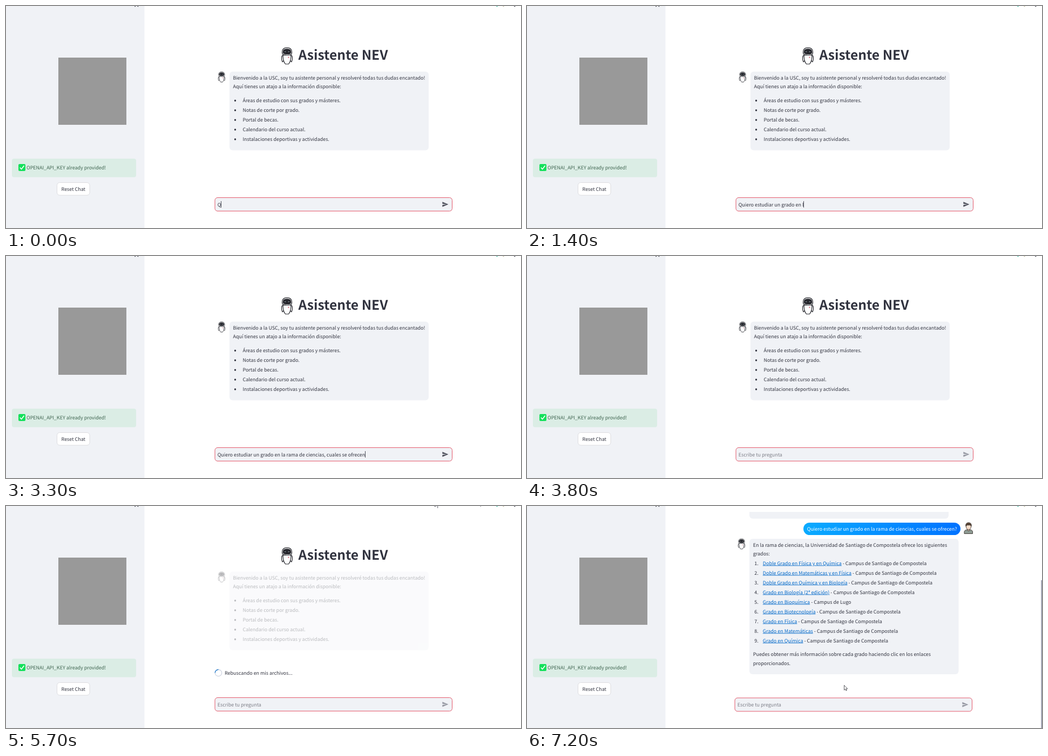
Animation of 954x413 px, one loop 7300 ms. Source, as an HTML page:

```html
<!DOCTYPE html>
<html lang="es">
<head>
<meta charset="utf-8">
<title>Chat</title>
<style>
  html, body { margin: 0; width: 100%; height: 100%; overflow: hidden; background: #fff; }
  svg { display: block; width: 954px; height: 413px; }
  text {
    font-family: "Noto Sans CJK JP", "Noto Sans CJK SC", "Noto Sans CJK", "Noto Sans", sans-serif;
    font-size: 8.96px; fill: #31333f; white-space: pre; text-rendering: geometricPrecision;
  }
  .title { font-size: 24.6px; font-weight: 700; }
  .link { fill: #0068c9; text-decoration: underline; }
</style>
</head>
<body>
<svg viewBox="0 0 954 413">
  <defs>
    <linearGradient id="sky"><stop stop-color="#0aabff"/><stop offset="1" stop-color="#0072ff"/></linearGradient>
    <g id="bot" stroke="#25262c" stroke-width="1.2" stroke-linejoin="round">
      <path d="M4 13.500C.5 16 0 22 2.500 27L5.500 24ZM18 13.500C21.500 16 22 22 19.500 27L16.500 24Z" fill="#fff"/>
      <path d="M4 14H18C19 21 17 27 14 31H8C5 27 3 21 4 14Z" fill="#fff"/>
      <path d="M2 9C2 3.500 5.500 .7 11 .7S20 3.500 20 9 16.500 14.500 11 14.500 2 14 2 9Z" fill="#fff"/>
      <path d="M3.800 8.500C3.800 4.500 6.500 3 11 3S18.200 4.500 18.200 8.500 15.500 12.500 11 12.500 3.800 12 3.800 8.500Z" fill="#25262c"/>
      <path d="M6.500 8H9M13 8H15.500" stroke="#a9b2b6" stroke-width="1.200"/>
      <circle cx="14" cy="18.500" r="1.200" fill="#e2788a" stroke="none"/>
    </g>
  </defs>
  <rect width="954" height="413" fill="#fff"/>

  <g id="page">
    <use href="#bot" x="509.500" y="77"/>
    <text class="title" x="541.500" y="100">Asistente NEV</text>
    <g id="welcome">
      <use href="#bot" transform="translate(392.500 122) scale(.63)"/>
      <rect x="414" y="122" width="369" height="146.500" rx="6" fill="#f0f2f6"/>
    </g>
    <g id="reply" transform="translate(2 245)">
      <rect x="512" y="31" width="291" height="23" rx="11.500" fill="url(#sky)"/>
      <g stroke="#3b3530" stroke-width=".9">
        <path d="M810 51.500V48C810 45.500 813 44.500 815.500 44H820.500C823 44.500 825.500 45.500 825.500 48V51.500Z" fill="#8d9a92"/>
        <path d="M815.800 42V45L818 46.500 820.200 45V42Z" fill="#f3cfb8"/>
        <ellipse cx="818" cy="38.500" rx="4.600" ry="5.500" fill="#f9dcc8"/>
        <path d="M813 38C812 33 814.500 31 818 31S824 33 823 38L821.500 35.500H815Z" fill="#5b4636"/>
      </g>
      <use href="#bot" transform="translate(390.500 60.500) scale(.63)"/>
      <rect x="412" y="61" width="387.500" height="252" rx="6" fill="#f0f2f6"/>
    </g>
  </g>

  <rect x="257" width="695" height="11" fill="#fff"/>
  <rect x="257" y="345" width="695" height="68" fill="#fff"/>

  <g id="wait">
    <circle cx="393.500" cy="310.500" r="6.200" fill="none" stroke="#ccd2df" stroke-width="1.200"/>
    <path id="arc" d="M389.100 306.100A6.200 6.200 0 0 1 397.900 306.100" fill="none" stroke="#3182ce" stroke-width="1.400"/>
    <text x="405" y="314">Rebuscando en mis archivos...</text>
  </g>

  <g id="box">
    <rect x="387" y="356.500" width="439.500" height="25" rx="5" fill="#f0f2f6" stroke="#e4586a"/>
    <text id="field" x="391.700" y="372.800"></text>
    <rect id="caret" y="363" width="1" height="12" fill="#4a4c57"/>
    <path id="send" d="M2 21L23 12 2 3V10L17 12 2 14Z" transform="translate(807.300 362.700) scale(.53)"/>
  </g>

  <g id="side">
    <rect width="256.500" height="413" fill="#f0f2f6"/>
    <path d="M238.500 0H240.500L239.500 1.200H238ZM243 0H245L245.500 1.200H244Z" fill="#31333f"/>
    <rect x="97" y="96" width="126" height="125" fill="#999"/>
    <rect x="11" y="284" width="230" height="34.500" rx="4" fill="#21c354" fill-opacity=".1"/>
    <rect x="23" y="294" width="13" height="13" rx="2" fill="#13e05b"/>
    <path d="M25.800 300.500L28.600 303.500 33.500 297" fill="none" stroke="#fff" stroke-width="1.600"/>
    <text x="38" y="304" style="fill:#3f6450">OPENAI_API_KEY already provided!</text>
    <rect x="94.500" y="328.500" width="60.500" height="23.500" rx="5" fill="#fff" stroke="#d6d6d9" stroke-width=".8"/>
    <text x="124.800" y="344" text-anchor="middle">Reset Chat</text>
  </g>

  <g id="tools">
    <rect x="908.500" width="2" height="1.300" fill="#2bb59a"/>
    <rect x="920.500" width="2" height="1" fill="#a9a37a"/>
    <rect x="941" width="2.500" height="1" fill="#31333f"/>
  </g>
  <g id="busy" fill="#777982">
    <path d="M793 0H797V1H793ZM799 0H800.200V4H799Z"/>
    <rect x="878.500" width="1.500" height="1"/>
  </g>
  <rect id="thumb" x="952.300" width="1.700" height="275" fill="#9a9eae"/>
  <path id="mouse" d="M587.500 333.500V342.500L589.600 340.600 591 343.600 592.300 343 591 340H593.800Z" fill="#fff" stroke="#33343a" stroke-width=".8"/>
</svg>

<script>
const NS = 'http://www.w3.org/2000/svg';
const $ = id => document.getElementById(id);
const LOOP = 7300, STEP = 100;
const SUBMIT = 3700, BUSY = 3900, FADED = 4400, ANSWER = 6500;
const SCROLL = 245, SCROLL_FROM = 6700, SCROLL_TO = 7100;
const QUESTION = 'Quiero estudiar un grado en la rama de ciencias, cuales se ofrecen?';
const TYPO = QUESTION.slice(0, 41) + 'n', FIXED = 2250;
const KEYS = [[0, 1], [1400, 29], [2050, 42], [FIXED, 41], [3300, 66], [3400, 67]];

function add(parent, tag, attrs, content = '') {
  const el = document.createElementNS(NS, tag);
  for (const k in attrs) el.setAttribute(k, attrs[k]);
  el.textContent = content;
  parent.append(el);
  return el;
}
const write = (parent, x, y, str, more = {}) => add(parent, 'text', { x, y, ...more }, str);

function build() {
  const welcome = $('welcome'), reply = $('reply');
  write(welcome, 420.500, 137, 'Bienvenido a la USC, soy tu asistente personal y resolveré todas tus dudas encantado!');
  write(welcome, 420.500, 153, 'Aquí tienes un atajo a la información disponible:');
  ['Áreas de estudio con sus grados y másteres.', 'Notas de corte por grado.', 'Portal de becas.',
    'Calendario del curso actual.', 'Instalaciones deportivas y actividades.'
  ].forEach((item, i) => {
    const y = 179 + 18 * i;
    add(welcome, 'circle', { cx: 424.500, cy: y - 3, r: 1.700, fill: '#31333f' });
    write(welcome, 438.500, y, item);
  });

  write(reply, 518.800, 46, QUESTION, { style: 'fill:#fff' });
  write(reply, 418.800, 75.500, 'En la rama de ciencias, la Universidad de Santiago de Compostela ofrece los siguientes');
  write(reply, 418.800, 91.500, 'grados:');
  ['Doble Grado en Física y en Química', 'Doble Grado en Matemáticas y en Física',
    'Doble Grado en Química y en Biología', 'Grado en Biología (2ª edición)', 'Grado en Bioquímica',
    'Grado en Biotecnología', 'Grado en Física', 'Grado en Matemáticas', 'Grado en Química'
  ].forEach((name, i) => {
    const y = 109.500 + 18 * i;
    write(reply, 428.800, y, `${i + 1}.`, { 'text-anchor': 'end' });
    const row = write(reply, 436.800, y, '');
    add(row, 'tspan', { class: 'link' }, name);
    add(row, 'tspan', {}, ' - Campus de ' + (i === 4 ? 'Lugo' : 'Santiago de Compostela'));
  });
  write(reply, 418.800, 279, 'Puedes obtener más información sobre cada grado haciendo clic en los enlaces');
  write(reply, 418.800, 295.500, 'proporcionados.');
}

const ramp = (t, a, b) => Math.min(1, Math.max(0, (t - a) / (b - a)));
const show = (id, on) => $(id).setAttribute('visibility', on ? 'visible' : 'hidden');
const move = (id, x, y) => $(id).setAttribute('transform', `translate(${x} ${y})`);

function typed(t) {
  let n = 1;
  for (let i = 1; i < KEYS.length; i++) {
    const [t0, n0] = KEYS[i - 1], [t1, n1] = KEYS[i];
    if (t >= t0) n = n0 + (n1 - n0) * ramp(t, t0, t1);
  }
  return (t < FIXED ? TYPO : QUESTION).slice(0, Math.floor(n + 1e-6));
}

function caretOn(t) {
  if (t < SUBMIT) return t < 2050 || t >= FIXED;
  return t < ANSWER && (t + 900) % 1000 < 500;
}

function draw(t) {
  const sent = t >= SUBMIT, done = t >= ANSWER, busy = t >= BUSY && !done;
  const dx = done ? -2 : 0;
  const p = ramp(t, SCROLL_FROM, SCROLL_TO), eased = p * p * (3 - 2 * p);

  move('page', dx, -SCROLL * eased);
  $('welcome').setAttribute('opacity', done ? 1 : 1 - 0.67 * ramp(t, BUSY, FADED));
  show('reply', done);

  show('wait', busy);
  show('busy', busy);
  $('arc').setAttribute('transform', `rotate(${100 + (t - 4500) * 0.48} 393.5 310.5)`);

  move('box', dx, done ? 0.5 : 0);
  const field = $('field');
  field.textContent = sent ? 'Escribe tu pregunta' : typed(t);
  field.style.fill = sent ? '#7d7f88' : '#31333f';
  $('send').setAttribute('fill', sent ? '#9799a3' : '#50525d');
  $('caret').setAttribute('x', Math.round(391.700 + (sent ? 0 : field.getComputedTextLength())));
  show('caret', caretOn(t));

  show('thumb', done);
  $('thumb').setAttribute('y', 138 * eased);
  show('mouse', t >= SCROLL_FROM - STEP);
}

build();
const start = performance.now();
function tick(now) {
  const t = Math.max(0, now - start) % LOOP;
  draw(Math.floor(t / STEP) * STEP);
  requestAnimationFrame(tick);
}
draw(0);
requestAnimationFrame(tick);
</script>
</body>
</html>
```
